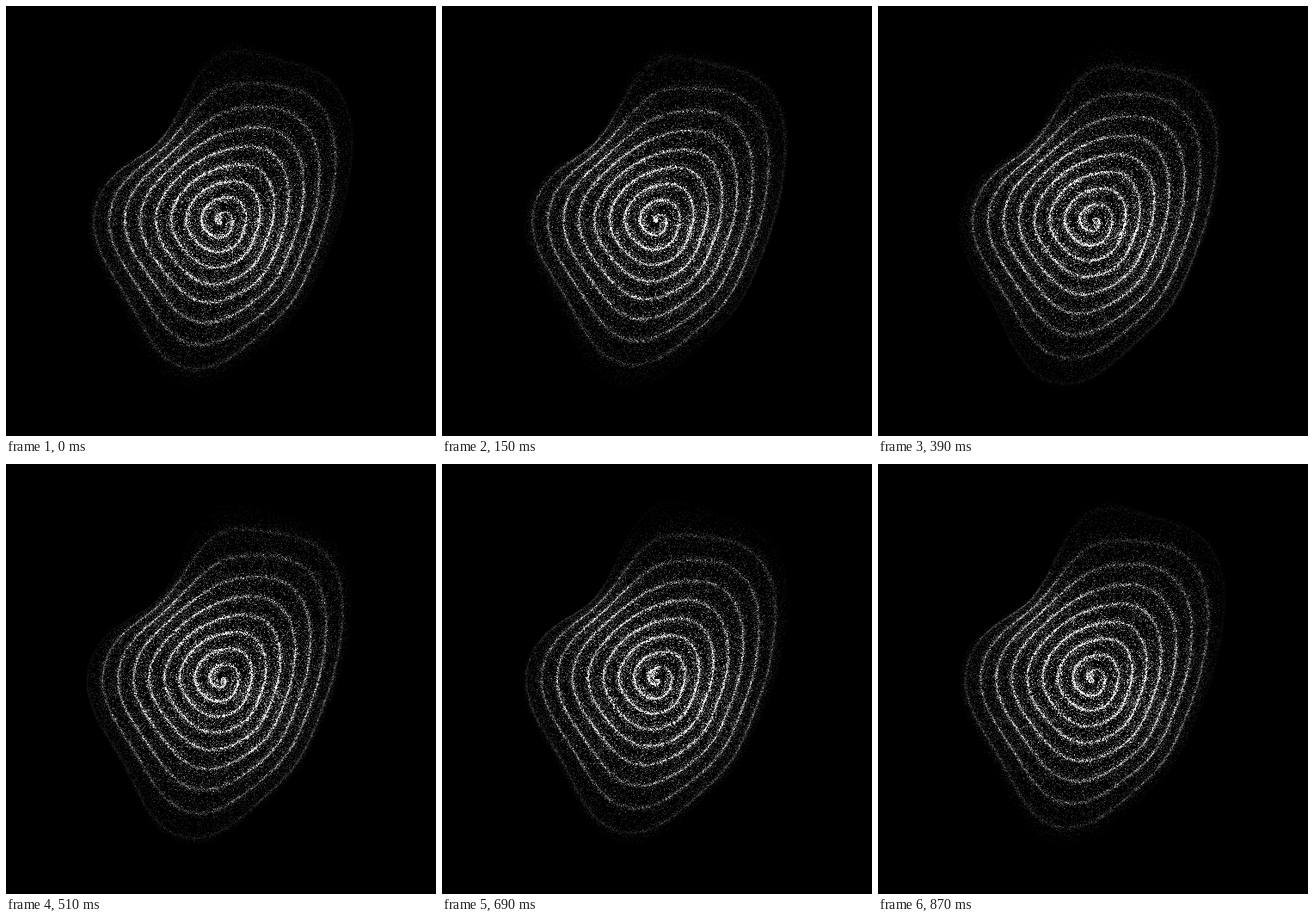
Write an HTML page with a canvas that moves like this. It is 500x500 px and loops after 0.9 s.

```html
<!DOCTYPE html>
<html lang="en">
<head>
<meta charset="utf-8">
<title>Dust spiral</title>
<style>
  html, body { margin: 0; width: 100%; height: 100%; overflow: hidden; background: #000; }
  canvas { display: block; width: 500px; height: 500px; }
</style>
</head>
<body>
<canvas id="stage" width="500" height="500"></canvas>
<script>
const SIZE = 500, MID = 250, LOOP = 900, STEP = 30;
const EDGE = 8.85;          // turns of the spiral from centre to rim
const PITCH = 16.5;         // pixels per turn before the bumps
const SEEDS = 12000;

// Bumps and dents that grow outward; angles run clockwise from the top
const BUMPS = [
  { at: 35, width: 30, height: 65, power: 1.8 },
  { at: 0, width: 16, height: 45, power: 6 },
  { at: 112, width: 32, height: -17, power: 1 },
  { at: 193, width: 25, height: 52, power: 2.8 },
  { at: 270, width: 25, height: 12, power: 1.3 },
  { at: 318, width: 25, height: -27, power: 3.5 }
];

function contour(deg, u) {
  return BUMPS.reduce((r, b) => {
    const away = (deg - b.at + 540) % 360 - 180;
    return r + b.height * Math.exp(-((away / b.width) ** 2)) * (u / EDGE) ** b.power;
  }, PITCH * u);
}

// Cached contour radii by direction and spiral turn
const DIRS = 720, FINE = 40, DEPTH = Math.ceil(EDGE * FINE) + 2;
const radius = new Float32Array(DIRS * DEPTH);
for (let d = 0; d < DIRS; d++) {
  for (let j = 0; j < DEPTH; j++) {
    radius[d * DEPTH + j] = contour(d * 360 / DIRS, j / FINE);
  }
}

function radiusAt(turn, u) {
  const p = u * FINE, j = Math.floor(p);
  const o = Math.floor(turn * DIRS) % DIRS * DEPTH + j;
  return radius[o] + (radius[o + 1] - radius[o]) * (p - j);
}

let state = 90210;
function rand() {
  state = (state + 0x6D2B79F5) | 0;
  let x = Math.imul(state ^ (state >>> 15), 1 | state);
  x = (x + Math.imul(x ^ (x >>> 7), 61 | x)) ^ x;
  return ((x ^ (x >>> 14)) >>> 0) / 4294967296;
}

// Each seed is a dot that repeats on every turn, crowded towards the line
const seeds = Array.from({ length: SEEDS }, () => ({
  turn: rand(),
  drift: (rand() - 0.5) * 0.6,
  off: (rand() < 0.5 ? -0.5 : 0.5) * rand() ** 2.6 + (rand() + rand() - 1) * 0.1,
  rank: rand(),
  light: 110 * (0.4 + 1.2 * rand())
}));

const ctx = document.getElementById("stage").getContext("2d");
const image = ctx.createImageData(SIZE, SIZE);
const glow = new Float32Array(SIZE * SIZE);

function plot(seed, s) {
  const home = EDGE - 9.25 + seed.turn + (1 + seed.drift) * s;
  const u = home + seed.off;
  const shown = Math.min(1, (home / EDGE - seed.rank) * 25 + 0.5);
  if (shown <= 0 || u < 0 || u >= EDGE) return;
  let turn = seed.turn + seed.drift * s;
  turn -= Math.floor(turn);
  const r = radiusAt(turn, u), a = turn * 2 * Math.PI;
  const x = Math.round(MID + r * Math.sin(a));
  const y = Math.round(MID - r * Math.cos(a));
  glow[y * SIZE + x] += seed.light * shown * (1 - u / EDGE) ** 0.65;
}

function draw(t) {
  glow.fill(0);
  for (const seed of seeds) {
    for (let n = -1; n < 16; n++) plot(seed, n - t);
  }
  const px = image.data;
  for (let i = 0; i < glow.length; i++) {
    px[4 * i] = px[4 * i + 1] = px[4 * i + 2] = glow[i];
    px[4 * i + 3] = 255;
  }
  ctx.putImageData(image, 0, 0);
}

const start = performance.now();
let last = -1;
function tick() {
  const ms = (performance.now() - start) % LOOP;
  const step = Math.floor(ms / STEP);
  if (step !== last) {
    last = step;
    draw(step * STEP / LOOP);
  }
  requestAnimationFrame(tick);
}
tick();
</script>
</body>
</html>
```
